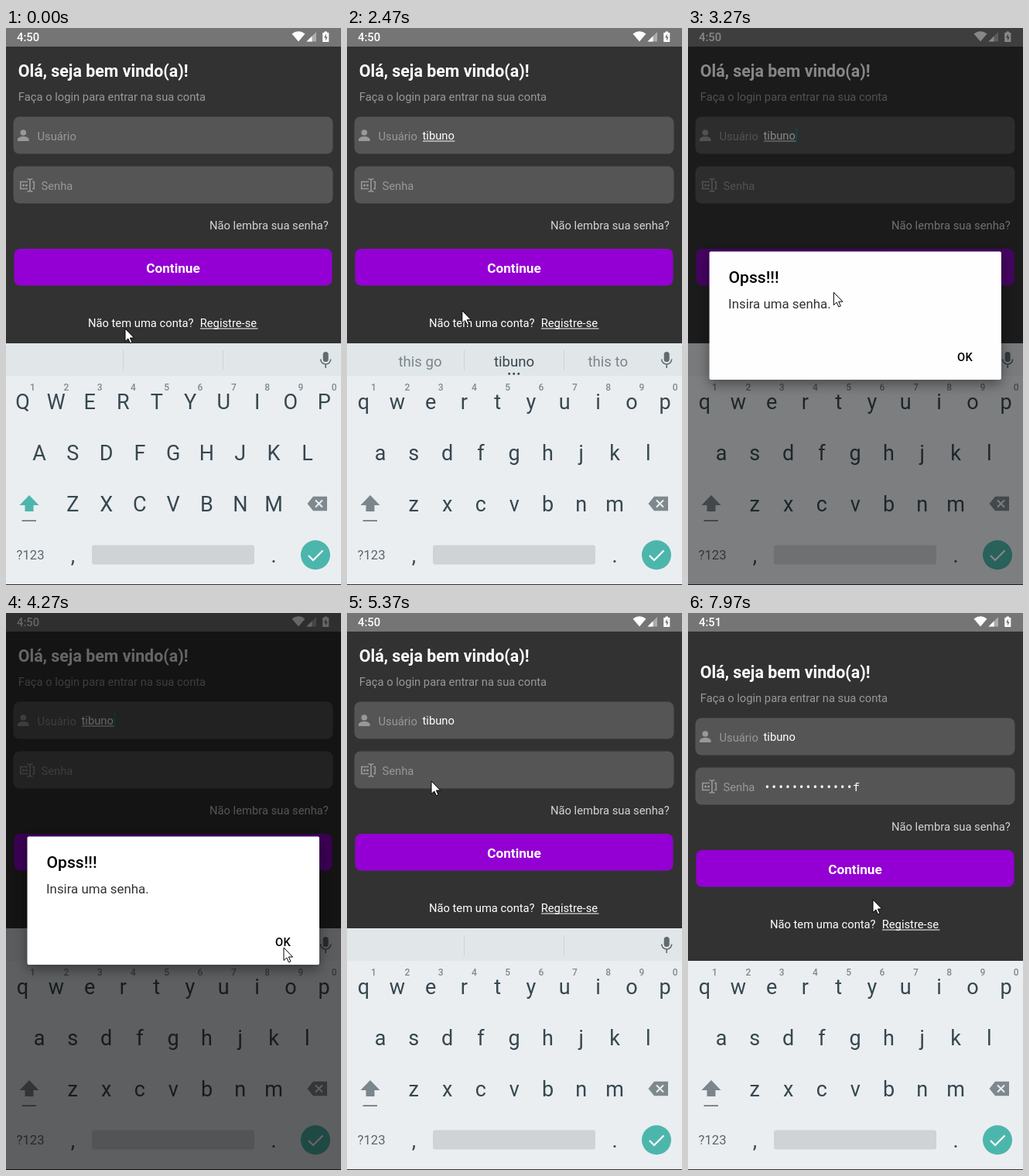
An HTML page that plays this animation: 433 px wide and 719 px high, repeating every 8 s.

```html
<!DOCTYPE html>
<html lang="pt-BR">
<head>
<meta charset="utf-8">
<title>Login</title>
<style>
  html, body { margin: 0; width: 100%; height: 100%; overflow: hidden; background: #323232; }
  svg { display: block; width: 433px; height: 719px; font: 14.75px Roboto, sans-serif; }
  text { white-space: pre; }
  .mid { text-anchor: middle; }
  .bold { font-weight: 700; }
  .medium { font-weight: 500; }
  .key { font-size: 27px; fill: #37474f; }
  .word { font-size: 18.6px; fill: #7a868c; }
  .mono { font-family: "Noto Sans Mono", monospace; }
  .line { fill: none; stroke-width: 1.6; }
  #dialog { filter: drop-shadow(0 6px 8px rgba(0, 0, 0, .4)); transform-origin: 216px 371px; }
</style>
</head>
<body>
<svg viewBox="0 0 433 719">
  <rect width="433" height="719" fill="#323232"/>

  <g id="form">
    <text class="bold" x="15.8" y="63" font-size="21.4" fill="#fff">Olá, seja bem vindo(a)!</text>
    <text x="15.8" y="94" fill="#989898">Faça o login para entrar na sua conta</text>
    <g fill="#555">
      <rect x="9.5" y="114.5" width="413" height="48" rx="8"/>
      <rect x="9.5" y="178.5" width="413" height="48" rx="8"/>
    </g>
    <g fill="#989898">
      <circle cx="22.3" cy="135" r="3.8"/>
      <path d="M15 146V144C15 141.500 19 140 22.300 140S29.700 141.500 29.700 144V146Z"/>
      <circle cx="22.600" cy="203" r="1.500"/>
      <circle cx="26.500" cy="203" r="1.500"/>
      <path class="line" stroke="#989898" d="M28 198.500H18.800V207.500H28M34 198.500H36.300V207.500H34M27.500 194.800Q31 194.800 31 197V209Q31 211.200 27.500 211.200M34.500 194.800Q31 194.800 31 197M31 209Q31 211.200 34.500 211.200"/>
      <text x="40.5" y="144.500">Usuário</text>
      <text x="45.500" y="208.500">Senha</text>
    </g>
    <text id="user" x="97.500" y="144" fill="#fff"></text>
    <rect id="underline" x="98" y="145.500" height="1" fill="#fff"/>
    <text id="pass" class="mono" x="98" y="208.500" fill="#fff"></text>
    <rect id="caret" width="1.500" height="20" fill="#009688"/>
    <text x="263" y="259.500" fill="#d3d3d3">Não lembra sua senha?</text>
    <g id="button">
      <rect x="10.500" y="285" width="411" height="47.500" rx="8" fill="#9400d3"/>
      <text class="mid bold" x="216" y="316" font-size="17.200" fill="#fff">Continue</text>
    </g>
    <g fill="#fff">
      <text x="105.900" y="386">Não tem uma conta?</text>
      <text x="250.700" y="386">Registre-se</text>
      <rect x="251" y="387.500" width="74.500" height="1"/>
    </g>
  </g>

  <rect width="433" height="24" fill="#757575"/>
  <g fill="#fff">
    <text id="clock" class="medium" x="14" y="17"></text>
    <path d="M369.500 7.500Q378 .800 386.500 7.500L378 17.500Z"/>
    <path d="M401 5V17.500H388.500Z" opacity=".4"/>
    <path d="M395.500 10.500V17.500H388.500Z"/>
    <path d="M411.500 4.500H415V6H417.300V18H409.200V6H411.500Z"/>
    <path d="M413.800 7.500L411 12.500H413V16.500L415.700 11.500H413.800Z" fill="#757575"/>
  </g>

  <g id="keyboard">
    <rect y="449" width="433" height="269" fill="#eaeef1"/>
    <g id="strip">
      <rect y="407" width="433" height="42" fill="#e1e6e9"/>
      <path d="M151.500 416V442M280.500 416V442" stroke="#cdd3d6"/>
      <g fill="#5f6b71">
        <rect x="409.700" y="418" width="7" height="13" rx="3.500"/>
        <path class="line" stroke="#5f6b71" stroke-width="1.800" d="M406.700 427.500A6.500 6.500 0 0 0 419.700 427.500M413.200 434V439"/>
      </g>
      <g id="words">
        <text class="word mid" x="94.500" y="436.500">this go</text>
        <text class="word mid" x="216" y="436.500" style="fill:#37474f">tibuno</text>
        <text class="word mid" x="337.300" y="436.500">this to</text>
        <path d="M209.700 446.300h0M215.700 446.300h0M221.700 446.300h0" stroke="#37474f" stroke-width="3" stroke-linecap="round"/>
      </g>
    </g>
    <g id="upper" class="key mid"></g>
    <g id="lower" class="key mid"></g>
    <g id="digits" class="mid medium" font-size="12" fill="#7f8a8f"></g>
    <path id="shift" d="M30 603L42.500 616H35.500V624H24.500V616H17.500Z"/>
    <rect x="20.500" y="635" width="18.500" height="2" fill="#7e898e"/>
    <path d="M389.500 614L397 604.800H415V623.200H397Z" fill="#7e898e"/>
    <path d="M400 609.500L409 618.500M409 609.500L400 618.500" stroke="#eaeef1" stroke-width="2"/>
    <text x="13.500" y="686" font-size="16.700" fill="#5a666c">?123</text>
    <text class="key mid" x="86.500" y="690">,</text>
    <text class="key mid" x="346" y="690">.</text>
    <rect x="111" y="667.500" width="210" height="25" rx="3" fill="#cfd3d6"/>
    <circle cx="400" cy="680.300" r="19" fill="#4db6ac"/>
    <path d="M391 681L397 687L409.500 674.500" fill="none" stroke="#fff" stroke-width="2.200"/>
  </g>

  <rect id="dim" width="433" height="719"/>
  <g id="dialog">
    <rect x="27.500" y="288.500" width="377.500" height="165.500" rx="2" fill="#fff"/>
    <text class="medium" x="52.500" y="329" font-size="21.070">Opss!!!</text>
    <text x="52" y="362" font-size="16.860" fill="#333">Insira uma senha.</text>
    <text class="medium" x="348" y="430" letter-spacing=".4">OK</text>
  </g>
  <path id="mouse" d="M0 0V16.500L3.800 13L6.500 18.800L9 17.700L6.400 12H11.600Z" fill="#fff" stroke="#000"/>
</svg>

<script>
const LOOP = 8000, NAME = "tibuno", SECRET = "asdfasdfasdasf";
const $ = id => document.getElementById(id);
const clamp = v => Math.max(0, Math.min(1, v));
const ramp = (t, a, b) => clamp((t - a) / (b - a));
const show = (id, on) => $(id).style.display = on ? "" : "none";
const set = (id, attrs) => { for (const k in attrs) $(id).setAttribute(k, attrs[k]); };

// time, x, y of the pointer tip
const MOUSE = [
  [0, 154, 388], [2440, 154, 388], [2470, 149, 365], [2570, 130, 338], [2680, 160, 318],
  [2800, 187, 312], [3170, 187, 312], [3270, 188, 341], [3700, 325, 415], [3970, 355, 432],
  [4030, 355, 432], [4070, 357, 432], [4269, 357, 432], [4270, 359, 432], [4570, 359, 432],
  [4770, 170, 289], [4950, 122, 230], [5170, 109, 217], [7650, 109, 217],
  [7870, 222, 386], [7970, 239, 370], [8000, 239, 370]
];

function mouseAt(t) {
  const i = MOUSE.findIndex(k => k[0] > t);
  const a = MOUSE[i - 1], b = MOUSE[i], u = ramp(t, a[0], b[0]);
  return [a[1] + (b[1] - a[1]) * u, a[2] + (b[2] - a[2]) * u];
}

function addKey(group, x, y, label) {
  const el = document.createElementNS("http://www.w3.org/2000/svg", "text");
  el.setAttribute("x", x);
  el.setAttribute("y", y);
  el.textContent = label;
  $(group).append(el);
}

["qwertyuiop", "asdfghjkl", "zxcvbnm"].forEach((row, r) => {
  [...row].forEach((c, i) => {
    const x = [21.5, 43, 86.300][r] + 43.300 * i, y = 492 + 66 * r;
    addKey("lower", x, y, c);
    addKey("upper", x, y, c.toUpperCase());
    if (!r) addKey("digits", x + 13, 468, (i + 1) % 10);
  });
});

const within = (t, spans) => spans.some(([a, b]) => t >= a && t < b);

function draw(t) {
  const onPass = t >= 5370, moved = t >= 5430;
  const typed = t < 1070 ? 0 : Math.min(6, Math.floor((t - 1070) / 100) + 1);
  const keyed = t < 6630 ? 0 : t >= 7370 ? 14 : Math.min(13, Math.floor((t - 6630) / 47.5) + 1);

  $("user").textContent = NAME.slice(0, typed);
  $("pass").textContent = keyed ? "•".repeat(keyed - 1) + SECRET[keyed - 1] : "";
  $("clock").textContent = t < 7700 ? "4:50" : "4:51";
  set("form", { transform: `translate(0 ${moved ? 21 : 0})` });

  const suggest = t >= 1730 && !onPass;
  show("underline", suggest);
  set("underline", { width: $("user").getComputedTextLength() });
  show("words", suggest);
  show("strip", !moved);

  show("caret", within(t, [[270, 770], [1070, 2230], [2730, 5170], [5470, 5970], [6470, 7870]]));
  set("caret", {
    x: 98 + $(onPass ? "pass" : "user").getComputedTextLength(),
    y: onPass ? 192 : 128
  });

  const caps = t < 1130 || within(t, [[5430, 6670]]);
  show("upper", caps);
  show("lower", !caps);
  set("shift", { fill: caps ? "#4db6ac" : "#7b868c" });

  set("button", { opacity: t < 3030 ? 1 : 0.7 + 0.3 * ramp(t, 3170, 3420) });

  // dialog fades and grows in, then only fades out
  const enter = 1 - (1 - ramp(t, 3130, 3280)) ** 2;
  const leave = (1 - ramp(t, 4600, 4785)) ** 2;
  const scale = 1 - 0.1 * (1 - ramp(t, 3130, 3350)) ** 5;
  set("dim", { opacity: 0.6 * ramp(t, 3130, 3310) * (1 - ramp(t, 4620, 4820)) });
  show("dialog", t > 3130 && t < 4785);
  $("dialog").style.opacity = enter * leave;
  $("dialog").style.transform = `scale(${scale})`;

  set("mouse", { transform: `translate(${mouseAt(t)})` });
}

function tick() {
  draw(performance.now() % LOOP);
  requestAnimationFrame(tick);
}
tick();
</script>
</body>
</html>
```
